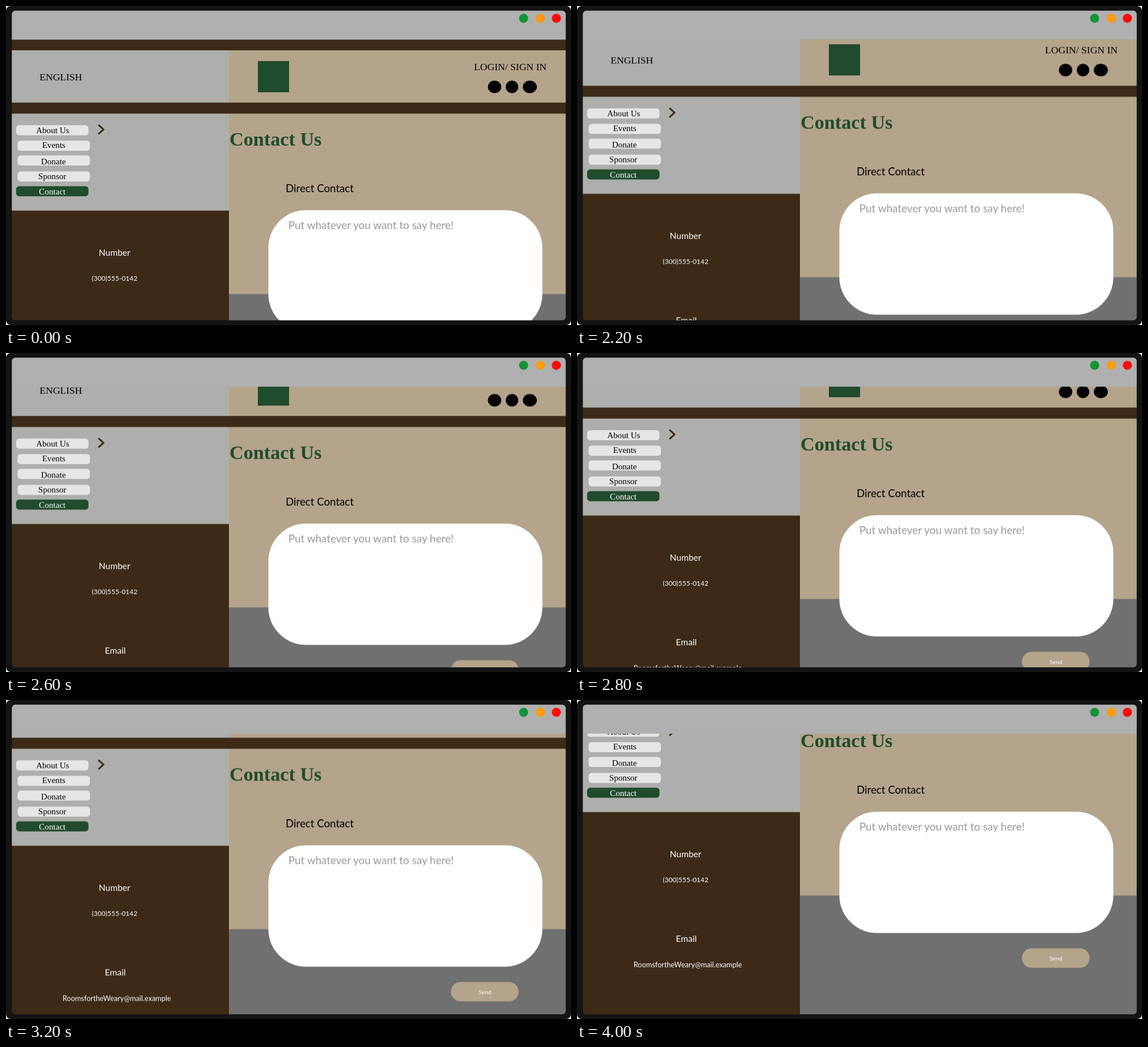
An HTML page for the animation above (6000 ms loop, 996 px wide and 562 px high).

```html
<!DOCTYPE html>
<html lang="en">
<head>
<meta charset="utf-8">
<title>Contact page</title>
<style>
  html, body { margin: 0; width: 100%; height: 100%; overflow: hidden; background: #fff; }
  svg { display: block; width: 996px; height: 562px; }
  text { text-anchor: middle; }
  .serif { font-family: "Liberation Serif", "Times New Roman", serif; }
  .sans { font-family: Lato, "Open Sans", sans-serif; }
  .bar { fill: #3c2a17; }
  .tan { fill: #b4a48b; }
  .green { fill: #204b2c; }
  .side { fill: #aeafac; }
  .light { fill: #fff; }
  .hint { fill: #999; }
</style>
</head>
<body>
<svg viewBox="0 0 996 562">
  <g id="page">
    <rect class="tan" x="393" y="60" width="594" height="448"/>
    <rect x="393" y="507.5" width="594" height="260" fill="#707070"/>
    <rect class="side" x="10" y="60" width="383" height="301"/>
    <rect class="bar" x="10" y="360.5" width="383" height="400"/>
    <rect class="bar" x="10" y="59" width="977" height="19"/>
    <rect class="bar" x="10" y="170.2" width="977" height="19.4"/>

    <rect class="green" x="444" y="97" width="55" height="55"/>
    <ellipse cx="861.3" cy="142.5" rx="11.8" ry="11"/>
    <ellipse cx="892" cy="142.5" rx="11" ry="11"/>
    <ellipse cx="923.4" cy="142.5" rx="12.4" ry="11"/>

    <g id="menu"></g>
    <path d="M163 209.3L171.8 217.5L163 225.7" fill="none" stroke="#3c2a17" stroke-width="3"/>

    <rect class="light" x="462.5" y="359.8" width="483" height="213.6" rx="66"/>
    <rect class="tan" x="784.3" y="600.4" width="119.4" height="34.4" rx="17.2"/>
    <g id="copy"></g>
  </g>

  <rect x="10" y="8" width="977" height="51.3" fill="#b0b0b0"/>
  <circle cx="912.5" cy="21.7" r="8" fill="#129436"/>
  <circle cx="942.2" cy="21.7" r="8" fill="#fb9b0f"/>
  <circle cx="970.2" cy="21.7" r="8" fill="#ff0a0a"/>
  <path fill="#141414" fill-rule="evenodd" d="M8 0H988a8 8 0 0 1 8 8V554a8 8 0 0 1 -8 8H8a8 8 0 0 1 -8 -8V8a8 8 0 0 1 8 -8Z
    M16.3 8.3a6 6 0 0 0 -6 6V547.8a6 6 0 0 0 6 6H980.7a6 6 0 0 0 6 -6V14.3a6 6 0 0 0 -6 -6Z"/>
  <path fill="#fff" d="M0 0H8A8 8 0 0 0 0 8ZM996 0V8A8 8 0 0 0 988 0ZM0 562V554A8 8 0 0 0 8 562ZM996 562H988A8 8 0 0 0 996 554Z"/>
</svg>
<script>
  const $ = id => document.getElementById(id);

  function add(parent, tag, attrs, label = "") {
    const el = document.createElementNS("http://www.w3.org/2000/svg", tag);
    for (const [name, value] of Object.entries(attrs)) el.setAttribute(name, value);
    el.textContent = label;
    parent.append(el);
  }

  const write = (parent, label, x, y, size, cls, weight = 400) =>
    add(parent, "text", { x, y, "font-size": size, "font-weight": weight, class: cls }, label);

  // label, button x, button y, text centre, baseline
  const menu = [
    ["About Us", 17.8, 210, 82.3, 224.3],
    ["Events", 20.4, 237.2, 84.2, 250.3],
    ["Donate", 20.4, 263.2, 83.6, 278.5],
    ["Sponsor", 20.4, 291.4, 81.6, 304.8],
    ["Contact", 17.8, 317.4, 81.6, 331.6]
  ];
  for (const [label, x, y, cx, base] of menu) {
    const active = label === "Contact";
    add($("menu"), "rect", { x, y, width: 127.6, height: 17.8, rx: 5.5, fill: active ? "#204b2c" : "#e6e6e6" });
    write($("menu"), label, cx, base, 15.1, active ? "serif light" : "serif");
  }

  // label, centre, baseline, size, classes, weight
  const copy = [
    ["ENGLISH", 96.8, 131.3, 17.5, "serif"],
    ["LOGIN/ SIGN IN", 889, 113.2, 17.6, "serif"],
    ["Contact Us", 475.2, 246.2, 34.2, "serif green", 700],
    ["Direct Contact", 553, 328, 18.7, "sans"],
    ["Put whatever you want to say here!", 643.4, 392.8, 18.9, "sans hint"],
    ["Number", 191.4, 440, 15.5, "sans light"],
    ["(300)555-0142", 191.5, 484.4, 12, "sans light"],
    ["Email", 192.8, 589, 15.7, "sans light"],
    ["RoomsfortheWeary@mail.example", 195.3, 634.2, 12.7, "sans light"],
    ["Send", 844.2, 622.2, 10.3, "sans light"]
  ];
  for (const row of copy) write($("copy"), ...row);

  // The page holds, then scrolls in even jumps and holds again.
  const LOOP = 6000, START = 2000, STEP = 200, JUMPS = 11, RISE = 14.82;
  const shift = n => `translateY(${-n * RISE}px)`;
  const frames = [{ offset: 0, transform: shift(0), easing: "step-end" }];
  for (let n = 1; n <= JUMPS; n++) {
    frames.push({ offset: (START + (n - 1) * STEP) / LOOP, transform: shift(n), easing: "step-end" });
  }
  frames.push({ offset: 1, transform: shift(JUMPS) });
  $("page").animate(frames, { duration: LOOP, iterations: Infinity });
</script>
</body>
</html>
```
